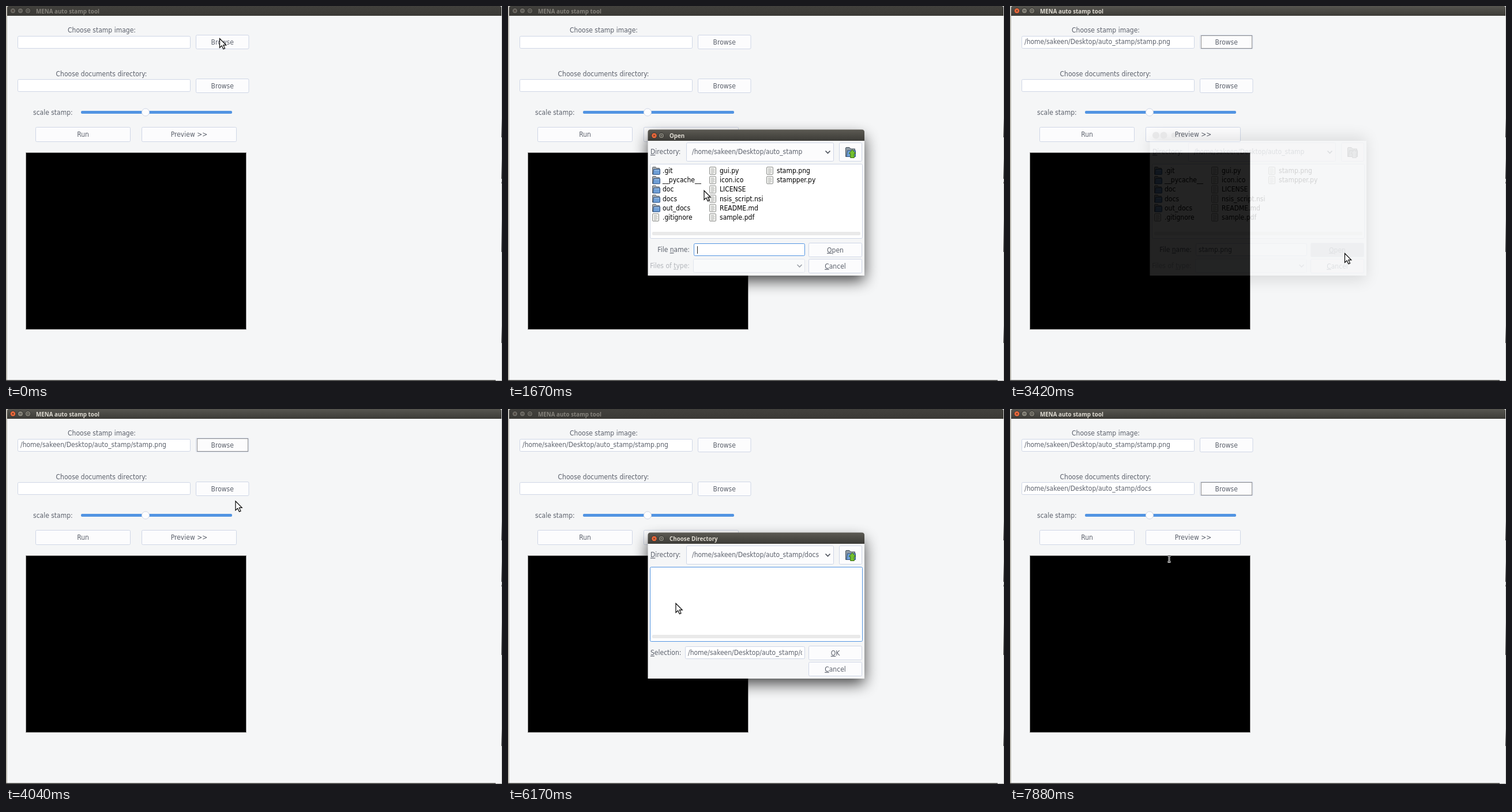
Recreate the animation shown at these times as an HTML page. Size 860 by 651 pixels, loop 8 s.

```html
<!DOCTYPE html>
<html lang="en">
<head>
<meta charset="utf-8">
<title>Auto stamp tool</title>
<style>
html, body { margin: 0; width: 100%; height: 100%; overflow: hidden; background: #f5f6f7; }
svg { display: block; width: 100vw; height: 100vh; }
text { font: condensed 12px "DejaVu Sans Condensed", "DejaVu Sans", sans-serif; fill: #5c616c; white-space: pre; }
.narrow text { font-size: 11.4px; letter-spacing: -.33px; }
.mid { text-anchor: middle; }
.item { fill: #000; }
.off { fill: #b3b6bb; }
svg .title { font: bold 9.8px "Noto Sans", sans-serif; letter-spacing: 0; fill: #dfdbd2; }
.u { text-decoration: underline; }
.box { fill: #fff; stroke: #cfd6e6; }
.button { fill: #fcfcfd; stroke: #cfd6e6; }
.focus { stroke: #5294e2; }
.ring { fill: none; stroke: #222; stroke-dasharray: 1 1; }
</style>
</head>
<body>
<svg id="stage" viewBox="0 0 860 651"></svg>
<script>
const LOOP = 8000;
const HOME = '/home/sakeen/Desktop/auto_stamp';
const stage = document.getElementById('stage');
const $ = id => document.getElementById(id);

// ---- markup helpers ----
const rect = (x, y, w, h, attrs = '') => `<rect x="${x}" y="${y}" width="${w}" height="${h}" ${attrs}/>`;
const text = (x, y, s, attrs = '') => `<text x="${x}" y="${y}" ${attrs}>${s}</text>`;
const field = (x, y, w, h, id = '') => rect(x, y, w, h, `rx="2" class="box" id="${id}"`);
const underline = (s, i) => `${s.slice(0, i)}<tspan class="u">${s[i]}</tspan>${s.slice(i + 1)}`;
const button = (x, y, w, h, label, id = '') =>
  rect(x, y, w, h, `rx="2" class="button" id="${id}"`) +
  text(x + w / 2, y + h / 2 + 4.2, label, 'class="mid"');
const group = (id, body, attrs = '') => `<g id="${id}" ${attrs}>${body}</g>`;
const chevron = (x, y, color, id) =>
  `<path id="${id}" d="M${x - 4} ${y - 2}l4 4 4-4" fill="none" stroke="${color}" stroke-width="1.7"/>`;

const marks = { close: 'M-1.7-1.7L1.7 1.7M1.7-1.7L-1.7 1.7', min: 'M-2 0H2', max: 'M-1.7-1.7H1.7V1.7H-1.7Z' };
const control = (x, y, kind, fill, ink) =>
  `<g transform="translate(${x} ${y})"><circle r="4.8" fill="${fill}" stroke="#32312d"/>
  <path d="${marks[kind]}" fill="none" stroke="${ink}" stroke-width=".9"/></g>`;

const folder = `<path d="M.5 13.5V1.5Q.5.5 1.5.5H6L7.5 2.5H12.5V4" fill="#a4a9ad" stroke="#5b6065"/>
  <path d="M1.5 13.5L2.5 4.5H13.5V12.5Q13.5 13.5 12.5 13.5Z" fill="#6f9fd6" stroke="#294d7e"/>
  <path d="M3.5 6H12.3" stroke="#b5d1ef"/>`;
const sheet = `<rect x=".5" y=".5" width="11" height="13" rx="1.5" fill="#f1f1ef" stroke="#8f918e"/>
  <path d="M3 3.5H8M3 5.5H9.5M3 7.5H8.5M3 9.5H9.5M3 11.5H7" stroke="#b6b8b4"/>`;

const rowY = r => 279 + r * 16.2;
const entry = (name, col, row, icon, id = '') => {
  const x = 250 + col * 99;
  return `<g transform="translate(${x} ${rowY(row)})">${icon}</g>` +
    text(x + 18, rowY(row) + 11, name, `class="item" id="${id}"`);
};

const dirs = ['.git', '__pycache__', 'doc', 'docs', 'out_docs'];
const files = ['.gitignore', 'gui.py', 'icon.ico', 'LICENSE', 'nsis_script.nsi',
  'README.md', 'sample.pdf', 'stamp.png', 'stampper.py'];

// ---- main window ----
const edges = rect(0, 0, 2, 651, 'fill="#c4c1b9"') + rect(1.4, 17, .6, 632, 'fill="#a5a39d"') +
  rect(859, 0, 1, 651, 'fill="#c9c9c9"') +
  [[195, 33], [265, 35], [304, 4], [370, 57], [555, 30]].map(([y, h]) =>
    rect(859, y, 1, h, 'fill="url(#sliver)"')).join('') +
  rect(0, 649.4, 849, 1.6, 'fill="#3b3b39"') + rect(849, 650, 11, 1, 'fill="#aaa"');

const mainBar = (id, bg, ink, closeFill, fill) => group(id,
  `<path d="M2 17V3Q2 0 5 0H856Q859 0 859 3V17Z" fill="${bg}"/>` +
  control(12, 8.3, 'close', closeFill, '#3a2a22') + control(25, 8.3, 'min', fill, '#383733') +
  control(38, 8.3, 'max', fill, '#383733') +
  text(52, 12.5, 'MENA auto stamp tool', `class="title" style="fill:${ink}"`));

const main = rect(0, 0, 860, 651, 'fill="#f5f6f7"') + edges +
  mainBar('barOff', 'url(#dim)', '#85827b', '#6a6862', '#6a6862') +
  mainBar('barOn', 'url(#bar)', '#dfdbd2', '#ee6a3c', '#858379') +
  text(166, 46, 'Choose stamp image:', 'class="mid"') +
  field(20.5, 52.5, 299, 21) + text(25, 66, '', 'id="stampPath"') + button(329.5, 50.5, 91.5, 24, 'Browse') +
  text(165.5, 122, 'Choose documents directory:', 'class="mid" id="probe"') +
  field(20.5, 127.5, 299, 21) + text(25, 142, '', 'id="docsPath"') + button(329.5, 126.5, 91.5, 24, 'Browse') +
  rect(331.5, 51.5, 88, 22, 'class="ring" id="ring1"') + rect(331.5, 127.5, 88, 22, 'class="ring" id="ring2"') +
  text(47, 188.5, 'scale stamp:') +
  rect(130, 182, 262, 5, 'rx="2" fill="#5294e2"') +
  '<circle cx="242" cy="184.5" r="6.5" fill="#fdfdfe" stroke="#cfd6e6"/>' +
  button(51.5, 210.5, 164, 25, 'Run') + button(235.5, 210.5, 164, 25, 'Preview &gt;&gt;') +
  rect(34.5, 254.5, 382, 307, 'fill="#000" stroke="#a3a3a3"');

// ---- dialog ----
const upIcon = `<g transform="translate(585 245)">
  <path d="M.5 16.5V2Q.5 .5 2 .5H7L9 3H16.5V16.5Z" fill="#8f9ba6" stroke="#46515c"/>
  <path d="M2 16.5L3.5 6H17.5V16.5Z" fill="#6f9fd6" stroke="#294d7e"/>
  <path d="M12 4.5L18 11H15.3V18.5H8.7V11H6Z" fill="#73c02f" stroke="#3b6d12"/></g>`;

const openPart = group('openPart',
  rect(465.5, 280, 62, 13.5, 'fill="#5294e2" id="stampMark"') +
  entry('.gitignore', 0, 5, sheet) +
  files.slice(1).map((f, i) => entry(f, 1 + Math.floor(i / 6), i % 6, sheet,
    f === 'stamp.png' ? 'stampItem' : '')).join('') +
  text(315, 427.3, underline('File name:', 5), 'text-anchor="end"') +
  field(322.5, 412.5, 192, 21, 'nameBox') + text(327, 427, '', 'id="nameText"') +
  rect(328, 417, 1, 13, 'fill="#222" id="nameCaret"') +
  text(315, 455.3, underline('Files of type:', 9), 'text-anchor="end" class="off"') +
  rect(321.5, 439.5, 193, 23, 'rx="2" fill="#f9fafb" stroke="#e2e6ee"') +
  chevron(505.5, 451, '#9fa3aa', 'typeArrow') +
  button(521.5, 411.5, 92, 24, underline('Open', 0), 'openButton'));

const dirPart = group('dirPart',
  text(247, 427.3, underline('Selection:', 0)) + field(307.5, 412.5, 207, 21, 'pathBox') +
  rect(312, 416, 193, 15, 'fill="#5294e2" id="pathMark"') +
  text(312, 427, '', 'id="pathText" clip-path="url(#pathClip)"') +
  rect(504, 417, 1, 13, 'fill="#222" id="pathCaret"') +
  button(521.5, 411.5, 92, 24, underline('OK', 0)));

const dialog = group('dialog',
  rect(243, 218, 375, 250, 'rx="4" fill="#000" opacity=".72" filter="url(#blur)"') +
  rect(242.5, 234, 375.5, 234, 'fill="#f5f6f7"') +
  group('dialogBar', '<path d="M242.5 234V219Q242.5 214.5 247 214.5H613.5Q618 214.5 618 219V234Z" fill="url(#dbar)"/>' +
    control(253.5, 225, 'close', '#ee6a3c', '#3a2a22') + control(266, 225, 'max', '#858379', '#383733') +
    text(280, 229, '', 'class="title" id="dialogTitle"')) +
  group('ghostBar', '<circle cx="253" cy="224.5" r="6"/><circle cx="266.5" cy="224.5" r="6"/>' +
    rect(280, 220, 27, 9, 'rx="4"'), 'fill="#555" opacity=".8"') +
  text(247, 257.3, underline('Directory:', 0)) +
  rect(309.5, 237.5, 255, 32, 'rx="2" class="button"') + text(319, 257.3, '', 'id="dirText"') +
  chevron(554.5, 253.5, '#4b505a', 'dirArrow') +
  rect(574.5, 237.5, 39, 32, 'rx="2" class="button"') + group('upIcon', upIcon) +
  field(246.5, 274.5, 368, 129, 'list') + rect(250, 392, 361, 6, 'rx="2" fill="#e9e9e9"') +
  group('folders', rect(267.5, rowY(3) + 1, 27, 13.5, 'fill="#5294e2" id="docsMark"') +
    dirs.map((d, i) => entry(d, 0, i, folder, d === 'docs' ? 'docsItem' : '')).join('')) +
  openPart + dirPart + button(521.5, 439.5, 92, 24, underline('Cancel', 0)));

const pointer = group('pointer',
  '<path d="M0 0V15.8L3.7 12.4L6.4 18.2L9 17.1L6.4 11.4H11.2Z" fill="#fff" stroke="#000" stroke-width="1.2"/>');
const beamPath = 'M-2.5-5.5H-.7L0-5L.7-5.5H2.5M0-5V5M-2.5 5.5H-.7L0 5L.7 5.5H2.5';
const beam = group('beam', `<path d="${beamPath}" fill="none" stroke="#fff" stroke-width="2.8"/>
  <path d="${beamPath}" fill="none" stroke="#111"/>`);

const ramp = (id, from, to) => `<linearGradient id="${id}" x2="0" y2="1">
  <stop stop-color="${from}"/><stop offset="1" stop-color="${to}"/></linearGradient>`;

stage.innerHTML = `<defs>${ramp('bar', '#575650', '#3c3b37')}${ramp('dim', '#42413d', '#3a3935')}
  ${ramp('dbar', '#5c5a53', '#3c3b37')}${ramp('sliver', '#c9c9c9', '#222')}
  <filter id="blur" x="-20%" y="-25%" width="140%" height="160%"><feOffset dy="9"/><feGaussianBlur stdDeviation="13"/></filter>
  <clipPath id="pathClip">${rect(309, 412, 201, 22)}</clipPath></defs>` + main + dialog + pointer + beam;

// Keep label widths alike where the condensed face is missing.
if ($('probe').getComputedTextLength() > 166) stage.classList.add('narrow');

// ---- timing ----
// Progress in n jumps, the first at a and the last at b.
const jumps = (t, a, b, n) => {
  if (t < a) return 0;
  if (t >= b) return 1;
  return (1 + Math.floor((t - a) / (b - a) * (n - 1) + 1e-6)) / n;
};

// Pointer moves: start, end, jumps, x, y
const moves = [
  [670, 710, 2, 367.5, 61.5], [880, 1040, 5, 326, 254.5], [1420, 1670, 4, 340, 320.5],
  [2000, 2290, 4, 452, 293.5], [2500, 2590, 2, 478, 287], [2680, 2880, 3, 564.5, 389.5],
  [2960, 3210, 4, 580.5, 429.5], [3500, 4040, 8, 398, 160], [4210, 4210, 1, 368.5, 135.5],
  [4380, 4380, 1, 388.5, 142], [4750, 5170, 6, 326, 279], [5420, 5670, 4, 291, 337.5],
  [6330, 6750, 5, 563, 420.5], [7130, 7130, 1, 534, 421.5], [7580, 7880, 4, 276, 260]
];

function pointerAt(t) {
  let x = 370.5, y = 56.5;
  for (const [a, b, n, tx, ty] of moves) {
    const p = jumps(t, a, b, n);
    x += (tx - x) * p;
    y += (ty - y) * p;
  }
  return [x, y];
}

function dialogAlpha(t) {
  if (t < 3330) return jumps(t, 290, 500, 4);
  if (t < 3500) return t < 3420 ? .55 : .14;
  return t < 7130 ? jumps(t, 4380, 4540, 3) : 0;
}

const show = (id, on) => $(id).setAttribute('visibility', on ? 'inherit' : 'hidden');
const say = (id, s) => { if ($(id).textContent !== s) $(id).textContent = s; };
const paint = (id, color) => { $(id).style.fill = color; };
const within = (v, a, b) => v >= a && v < b;

function draw(t) {
  const [x, y] = pointerAt(t);
  const alpha = dialogAlpha(t);
  const second = t >= 4000;
  const closing = within(t, 3330, 3500);
  const picked = t >= 2590;
  const clicked = t >= 5830;
  const entered = t >= 6170;
  const active = within(t, 3330, 4380) || t >= 7130;

  show('barOn', active);
  show('barOff', !active);
  show('ring1', within(t, 3330, 4380));
  show('ring2', t >= 7130);
  say('stampPath', t >= 3330 ? HOME + '/stamp.png' : '');
  say('docsPath', t >= 7130 ? HOME + '/docs' : '');

  $('dialog').setAttribute('opacity', alpha);
  show('dialog', alpha > 0);
  show('dialogBar', !closing);
  show('ghostBar', closing);
  $('upIcon').style.filter = closing ? 'grayscale(1)' : '';
  say('dialogTitle', second ? 'Choose Directory' : 'Open');
  say('dirText', HOME + (entered ? '/docs' : ''));
  const hover = alpha === 1 && within(x, 310, 565) && within(y, 238, 270);
  $('dirArrow').style.stroke = hover ? '#5294e2' : '';
  $('list').classList.toggle('focus', second ? clicked : picked && !closing);
  show('folders', !entered);

  show('openPart', !second);
  const marked = picked && !closing;
  show('stampMark', marked);
  paint('stampItem', marked ? '#fff' : '');
  say('nameText', picked ? 'stamp.png' : '');
  $('nameBox').classList.toggle('focus', !picked);
  show('nameCaret', !second && !picked && !within(t, 2000, 2290));
  paint('openButton', closing ? '#c6cad2' : '');

  show('dirPart', second);
  const docsOn = second && clicked && !entered;
  show('docsMark', docsOn);
  paint('docsItem', docsOn ? '#fff' : '');
  $('pathBox').classList.toggle('focus', !clicked);
  show('pathMark', second && !clicked);
  say('pathText', HOME + (entered ? '/docs' : ''));
  paint('pathText', clicked ? '' : '#fff');
  show('pathCaret', second && !clicked && (t < 4540 || (t - 4540) % 900 < 600));

  const overText = alpha === 0 && within(x, 34, 417) && within(y, 254, 562);
  show('pointer', !overText);
  show('beam', overText);
  for (const id of ['pointer', 'beam']) $(id).setAttribute('transform', `translate(${x} ${y})`);
}

const start = performance.now();
function tick() {
  draw((performance.now() - start) % LOOP);
  requestAnimationFrame(tick);
}
draw(0);
requestAnimationFrame(tick);
</script>
</body>
</html>
```
